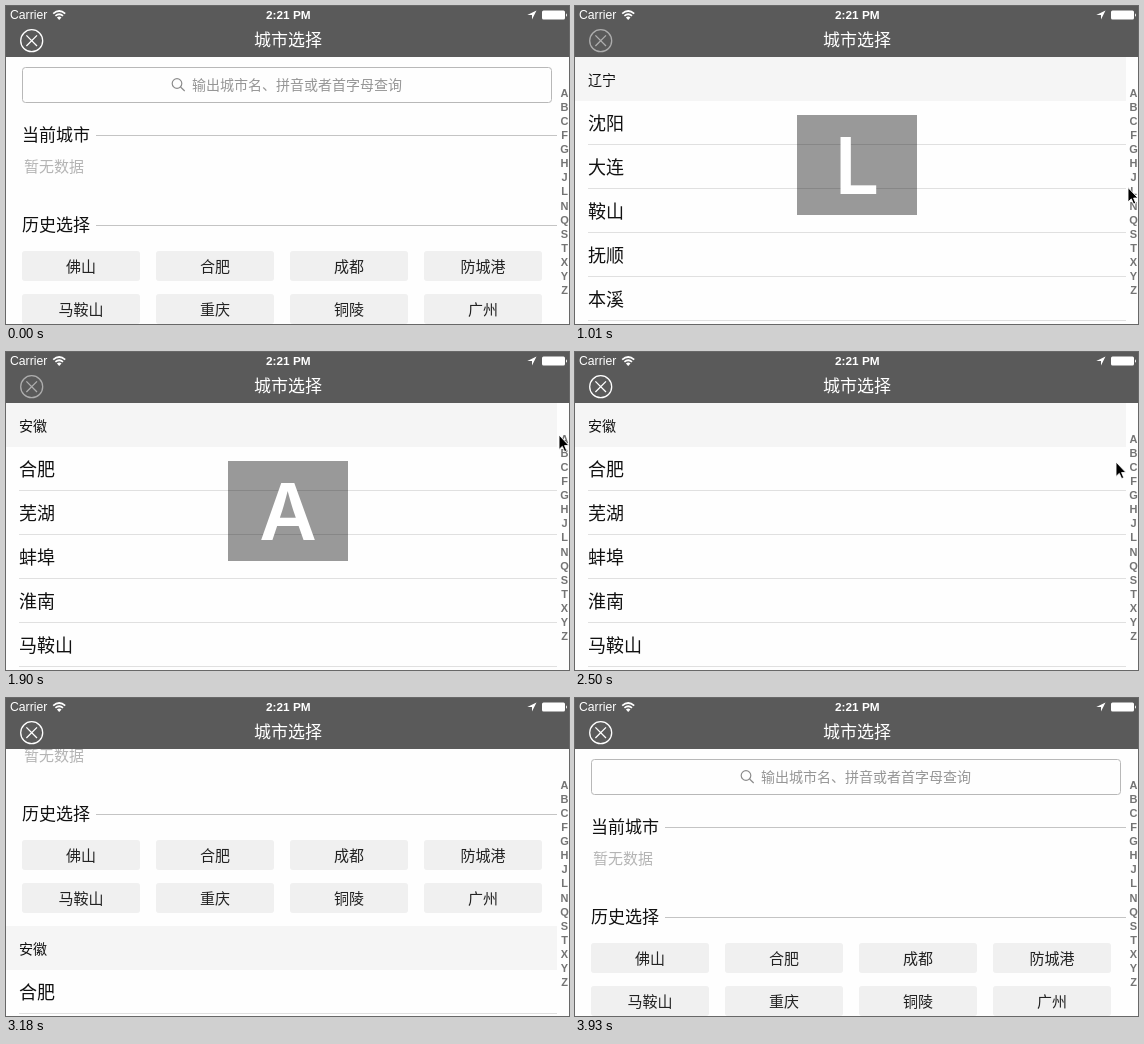
An HTML page for the animation above (4080 ms loop, 563 px wide and 318 px high).

```html
<!DOCTYPE html>
<html lang="zh">
<head>
<meta charset="utf-8">
<style>
  html, body { margin: 0; width: 100%; height: 100%; overflow: hidden; background: #fefefe; }
  svg { display: block; font-family: "Noto Sans CJK SC", "Noto Sans CJK", sans-serif; }
  .latin { font-family: "Liberation Sans", Arial, sans-serif; }
  .bold { font-weight: 700; }
  #big { font-family: Inter, sans-serif; font-weight: 600; }
</style>
</head>
<body>
<svg width="563" height="318" viewBox="0 0 563 318">
  <rect width="563" height="318" fill="#fefefe"/>
  <g id="page"></g>
  <g id="index" class="latin bold" fill="#747474"></g>
  <g id="hud">
    <rect x="222" y="109" width="120" height="100" fill="#000" fill-opacity=".4"/>
    <text id="big" x="282" y="187.5" font-size="79" fill="#fff" text-anchor="middle"></text>
  </g>
  <rect width="563" height="51" fill="#5a5a5a"/>
  <g id="bar" fill="#fff">
    <text class="latin" x="4" y="13.3" font-size="12.2">Carrier</text>
    <text class="latin bold" x="282.3" y="13.3" font-size="11.8" text-anchor="middle">2:21 PM</text>
    <path d="M47.2 7.6Q53.2 2.4 59.2 7.6M49.4 9.9Q53.2 6.6 57 9.9" fill="none" stroke="#fff" stroke-width="1.7"/>
    <path d="M50.9 11.4Q53.2 9.5 55.5 11.4L53.2 13.9Z"/>
    <path d="M530.5 4.6L521.3 9H526V13.6Z"/>
    <rect x="536" y="4.5" width="23" height="9" rx="1.5"/>
    <path d="M560 7.2Q562 9 560 10.8Z"/>
  </g>
  <g id="close" fill="none" stroke="#fff" stroke-width="1.3">
    <circle cx="25.7" cy="34.7" r="11"/>
    <path d="M20.4 29.4L31 40M31 29.4L20.4 40"/>
  </g>
  <g id="cursor">
    <path d="M0 0V14.5L3.3 11.4L5.6 16.6L7.8 15.7L5.6 10.6H10Z" stroke="#fff" stroke-width=".9"/>
  </g>
</svg>
<script>
const LOOP = 4080, TOP = 51, ROW = 44, HOME = 280, STEP = 14.07;
const letters = "ABCFGHJLNQSTXYZ";
const provinces = [
  "安徽 合肥 芜湖 蚌埠 淮南 马鞍山 淮北",
  "北京 东城 西城 朝阳 丰台 海淀 通州",
  "重庆 万州 涪陵 渝中 大渡口 江北 沙坪坝",
  "福建 福州 厦门 莆田 三明 泉州 漳州",
  "广东 广州 韶关 深圳 珠海 汕头 佛山",
  "河北 石家庄 唐山 秦皇岛 邯郸 邢台 保定",
  "吉林 长春 吉林 四平 辽源 通化 白山",
  "辽宁 沈阳 大连 鞍山 抚顺 本溪 丹东",
  "内蒙古 呼和浩特 包头 乌海 赤峰 通辽 鄂尔多斯",
  "青海 西宁 海东地区 海北自治州 黄南自治州 海南自治州 果洛自治州"
];
const recent = "佛山 合肥 成都 防城港 马鞍山 重庆 铜陵 广州".split(" ");

const $ = id => document.getElementById(id);
const text = (s, x, cy, size, fill, anchor = "start") =>
  `<text x="${x}" y="${cy + size * .38}" font-size="${size}" fill="${fill}" text-anchor="${anchor}">${s}</text>`;
const rect = (x, y, w, h, attrs) =>
  `<rect x="${x}" y="${y}" width="${w}" height="${h}" ${attrs}/>`;
const sectionTop = i => HOME + i * ROW * 7;

function home() {
  const heading = (s, y) => text(s, 16, y, 17, "#111") + rect(90, y, 461, 1, 'fill="#c4c4c4"');
  return rect(16.5, 61.5, 529, 35, 'rx="3" fill="none" stroke="#b8b8b8"') +
    '<g fill="none" stroke="#8c8c8c" stroke-width="1.2"><circle cx="171" cy="77.5" r="4.8"/><path d="M174.5 81L178.7 85"/></g>' +
    text("输出城市名、拼音或者首字母查询", 186, 78.5, 14, "#969696") +
    heading("当前城市", 129) +
    text("暂无数据", 18, 160, 15, "#b4b4b4") +
    heading("历史选择", 219) +
    recent.map((name, i) => {
      const x = 16 + i % 4 * 134, y = 245 + (i >> 2) * 43;
      return rect(x, y, 118, 30, 'rx="3" fill="#f0f0f0"') + text(name, x + 59, y + 15, 15, "#222", "middle");
    }).join("");
}

function section(line, i) {
  const [title, ...cities] = line.split(" "), y = TOP + sectionTop(i);
  return rect(0, y, 551, ROW, 'fill="#f5f5f5"') + text(title, 13, y + 22.5, 14, "#111") +
    cities.map((name, j) => {
      const top = y + ROW * (j + 1);
      return text(name, 13, top + 21.7, 18, "#111") + rect(13, top + 43, 538, 1, 'fill="#e0e0e0"');
    }).join("");
}

$("page").innerHTML = home() + provinces.map(section).join("");
$("index").innerHTML = [...letters].map((c, i) =>
  `<text x="558.5" y="${91 + i * STEP}" font-size="11" text-anchor="middle">${c}</text>`).join("");
$("bar").insertAdjacentHTML("beforeend", text("城市选择", 282, 34, 17, "#fff", "middle"));

const ramp = (k, a, b) => Math.min(1, Math.max(0, (k - a) / (b - a)));
const ease = u => u < .5 ? 2 * u * u : 1 - 2 * (1 - u) ** 2;

// Position along the index: down to Q, a short hold, back to A
const sweep = (k, lead = 0) => Math.max(0, Math.min((k - 12) * 1.4, 9, (31 - lead - k) * 1.14));

// Pull the list down to the home part, overshoot and settle
const pull = k => Math.round(HOME * ease(ramp(k, 48, 58.5)) +
  14.7 * ramp(k, 55, 59) * (1 - ramp(k, 59, 67)) ** 1.5);

const tick = t => Math.floor((60 - Math.sqrt(3600 - .08 * (t + 12))) / .04);
const move = (el, x, y) => el.setAttribute("transform", `translate(${x} ${y})`);

function draw(t) {
  const k = tick(t), i = Math.round(sweep(k)), drag = pull(k);
  const enter = ramp(k, 3, 9), leave = ramp(k, 33, 37), cross = ramp(k, 42, 47);
  move($("page"), 0, k < 12 ? 0 : drag - sectionTop(i));
  $("big").textContent = letters[i];
  $("hud").setAttribute("opacity", k < 12 ? 0 : 1 - ramp(k, 34, 36));
  $("close").setAttribute("opacity", k >= 12 && k < 35 ? .5 : 1);
  move($("cursor"),
    k < 3 ? 600 : 563 - 10 * enter - 12 * leave - 127 * cross,
    90 - 7 * enter + 27 * leave + 47 * cross + STEP * sweep(k, 2) + drag);
}

const start = performance.now();
function loop() {
  draw((performance.now() - start) % LOOP);
  requestAnimationFrame(loop);
}
loop();
</script>
</body>
</html>
```
